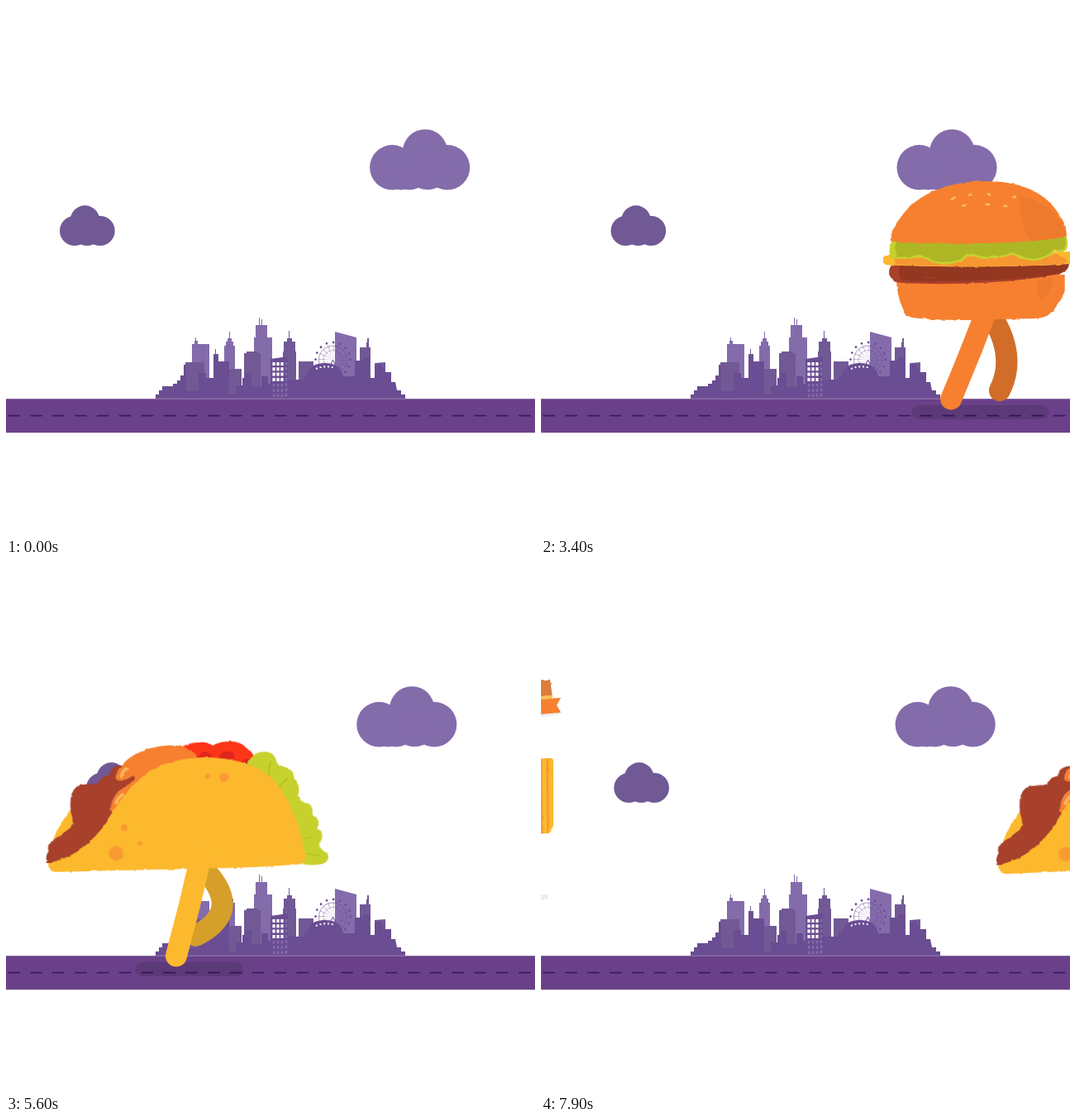
An HTML page without scripts that plays this animation: 640x640 px, repeating every 8 s.

```html
<!DOCTYPE html>
<html lang="en">
<head>
<meta charset="utf-8">
<title>Walking food</title>
<style>
html, body { margin: 0; width: 100%; height: 100%; overflow: hidden; background: #fff; }

/* One clock in seconds, ten ticks each, drives every formula below */
@property --t { syntax: "<number>"; inherits: true; initial-value: 0; }
@keyframes clock { from { --t: 0; } to { --t: 8; } }
svg { display: block; width: 100vw; height: 100vh; animation: clock 8s steps(80) -20ms infinite; }

.light { fill: #846cab; }
.mid { fill: #715995; }
.dark { fill: #6a4d92; }

/* Clouds drift, then turn back */
.cloud { transform: translateX(calc(min(var(--t), 11.96 - var(--t)) * var(--speed))); }
.big { --speed: -2.83px; }
.small { --speed: 5.73px; }

/* Walkers cross at constant speed; --at is when they stand as drawn, --mid when the far leg is upright */
.run { transform: translateX(calc((var(--t) - var(--at)) * 217.6px)); }
.burger { --at: 1.6; --mid: 1.39; }
.taco { --at: 6.3; --mid: 4.88; }
.cup { --at: 7.9; }
.burger, .taco {
  --p: calc((var(--t) - var(--mid)) * 300deg);
  --beat: cos(2 * var(--p));
}

/* Bobbing, twice per stride */
.sway {
  --sink: calc(.5 - .5 * cos((var(--t) - .4) * 600deg));
  transform: translateX(calc(var(--sink) * -6px));
}
.part { transform: translateY(calc(var(--sink) * var(--drop) * 1px)); }
.rock { transform-origin: 345px 255px; transform: rotate(calc(-.73deg - 1.47deg * var(--beat))); }
.shadow {
  transform: scaleX(calc(1.45 - .45 * var(--beat)));
  stroke: #000; stroke-opacity: .13; stroke-width: 17; stroke-linecap: round; vector-effect: non-scaling-stroke;
}

/* A leg is a unit curve: the first axis bends the knee, the second runs from hip to foot */
.leg {
  --q: calc(var(--p) + var(--turn, 0deg));
  --lift: pow(max(0, 0 - cos(var(--q))), 1.5);
  --lag: max(0, 0 - cos(var(--q) - 45deg));
  --knee: pow(max(0, 0 - cos(var(--q) - 15deg)), 2);
  transform: matrix(
    calc(1.5 + 78 * var(--knee)),
    calc(18 * var(--lift)),
    calc(2 + var(--lean, 0) - 55 * sin(var(--q)) + 8 * sin(2 * var(--q)) - 36 * var(--lag)),
    calc(119.5 - 34 * var(--lift)),
    0, 0);
  fill: none; stroke-width: 26; stroke-linecap: round; vector-effect: non-scaling-stroke;
}
.near { --turn: 180deg; --lean: -7; }
</style>
</head>
<body>
<svg viewBox="0 0 640 640" xmlns="http://www.w3.org/2000/svg">
  <defs>
    <filter id="rough" color-interpolation-filters="sRGB">
      <feTurbulence type="fractalNoise" baseFrequency=".13" numOctaves="2" seed="4"/>
      <feDisplacementMap in="SourceGraphic" scale="2.8" xChannelSelector="R" yChannelSelector="G"/>
    </filter>
  </defs>

  <g class="cloud big light">
    <circle cx="467.3" cy="195.3" r="27.2"/><circle cx="507" cy="176.5" r="27.2"/><circle cx="534" cy="195.3" r="27.2"/>
    <circle cx="478" cy="201" r="21.5"/><circle cx="488" cy="199" r="23.5"/><circle cx="510" cy="195.3" r="27"/>
  </g>
  <g class="cloud small mid">
    <circle cx="83" cy="272" r="18"/><circle cx="98" cy="272.4" r="17.6"/>
    <circle cx="95.5" cy="259" r="17.7"/><circle cx="113.7" cy="272" r="18"/>
  </g>

  <!-- City -->
  <g class="light">
    <path d="M225 475V409H228V405H229V401H230V405H232V409H246V475Z"/>
    <path d="M264 475V411H266V406H268V402H270V394H271V402H273V406H275V411H277V475Z"/>
    <path d="M300 475V401H302V386H306V377H307V386H309V379H310V386H316V401H322V475Z"/>
    <path d="M398 475V394L424 401V475Z"/>
  </g>
  <g class="mid">
    <path d="M217 475V431H240V475ZM251 475V421H253V415H254V421H257V475ZM270 475V439H285V475Z"/>
    <path d="M288 475V420H291V418H305V420H308V475ZM354 475V430H372V475Z"/>
    <path d="M335 475V418H336V406H340V402H342V393H343V402H346V406H350V418H351V475Z"/>
    <path d="M428 475V413H436V407H437V402H439V413H441V475ZM446 475V432L459 431V443H466V475Z"/>
  </g>
  <g fill="none" stroke="#6a4d92">
    <circle cx="395.5" cy="428" r="21" stroke-width="2.8" stroke-linecap="round" stroke-dasharray="0 8.247"/>
    <circle cx="395.5" cy="428" r="17" stroke-width=".6"/>
    <circle cx="395.5" cy="428" r="11.5" stroke-width=".4"/>
    <circle cx="395.5" cy="428" r="8.5" stroke-width="17" stroke-opacity=".6" stroke-dasharray=".4 2.938"/>
    <path d="M390 440L395.5 428L401 440"/>
  </g>
  <g class="dark">
    <path d="M181 475V470H185V465H189V460H202V457H207V453H211V447H215V434H218V466H233V444H242V450H251V423H256V430H270V470H278V459H286V450H290V444H297V461H309V448H317V457H320V427L341 424V452H360V475Z"/>
    <path d="M360 475V447H364Q367 432 386 432Q405 432 408 448H422V429H432V425H440V450H446V436L452 432L459 443H466V455H471L473 465H478V470H483V475Z"/>
  </g>
  <path d="M324 431V455M329 431V455M334 431V455" stroke="#fff" stroke-width="3.2" stroke-dasharray="4 2.3"/>
  <path d="M324 457V473M329 457V473M334 457V473M339 431V473" stroke="#846cab" stroke-width="2.5" stroke-dasharray="3.5 2.8"/>
  <path d="M375 439Q386 434 398 438" fill="none" stroke="#fff" stroke-width="2" stroke-dasharray="2 2.8"/>

  <!-- Road -->
  <path d="M0 475.3H640V516.3H0Z" fill="#6a4189"/>
  <path d="M182 475H483" stroke="#8a6fab" stroke-width=".8"/>
  <path d="M2.5 495.7H640" stroke="#3f1768" stroke-width="1.7" stroke-dasharray="14.5 12.35"/>

  <!-- Burger -->
  <g class="run burger"><g class="sway">
    <g transform="translate(140 491.5)"><path class="shadow" d="M-43.5 0H43.5"/></g>
    <g transform="translate(140 356)"><path class="leg" stroke="#d16d28" d="M0 0Q1 .5 0 1"/></g>
    <g filter="url(#rough)">
      <g class="part" style="--drop:3">
        <path fill="#f6802f" d="M38 325H242V345Q236 362 222 374Q215 378 205 378L130 380Q80 380 58 377Q50 376 47 368Q38 350 38 325Z"/>
        <path fill="#ee7a2d" d="M209 331L228 329Q224 350 213 357Q207 350 209 331Z"/>
      </g>
      <g class="part" style="--drop:5.5">
        <path fill="#a8402a" d="M33 313Q28 318 30 327Q33 334 45 335C100 338 180 335 225 326Q247 324 247 312C200 316 90 316 33 313Z"/>
        <path fill="#933721" d="M44 314Q38 323 45 332C100 335 180 332 225 325Q246 322 247 312C200 316 90 316 44 314Z"/>
        <path d="M72 328L86 330" stroke="#a8402a" stroke-width="1.5"/>
      </g>
      <g class="part" style="--drop:7">
        <path fill="#fcb92e" d="M28 301L250 297Q258 298 260 307Q258 312 248 312Q150 318 28 313.500Q22 313 22 307Q23 301 28 301Z"/>
        <path fill="#f79732" d="M36 304L232 300L246 308Q245 312 232 313Q130 317 36 313Z"/>
      </g>
      <g class="part" style="--drop:8.5">
        <path fill="#adb725" stroke="#c7d12e" stroke-width="2.5" d="M36 282Q28 296 33 304Q50 306 64 303Q76 304 84 310Q100 313 116 308Q124 300 130 301Q145 307 155 303Q170 304 179 299Q192 307 206 307Q224 304 229 295Q238 298 243 294Q246 287 242 277Z"/>
        <path d="M36 284Q30 296 37 304" fill="none" stroke="#c7d12e" stroke-width="6"/>
        <path d="M64 301L72 303" stroke="#c7d12e" stroke-width="1.8"/>
      </g>
      <g class="part" style="--drop:7">
        <path fill="#f6802f" d="M31 284Q32 269 44 255C62 229 98 212 145 212C200 212 226 232 241 262Q245 271 244 279C200 288 90 289 34 285Z"/>
        <path fill="#ee7a2d" d="M187 230C189 255 191 272 201 285L243 279C243 262 225 237 187 230Z"/>
        <path stroke="#fcb95a" stroke-width="3" stroke-linecap="round" d="M105.500 234L108.500 232M126 228H128.500M150 228H152M180 231H182M118.500 242L121.500 241M147 240H150M169 242H172"/>
      </g>
    </g>
    <g transform="translate(152 356)"><path class="leg near" stroke="#f6802f" d="M0 0Q1 .5 0 1"/></g>
  </g></g>

  <!-- Taco -->
  <g class="run taco">
    <g transform="translate(374 491.5)"><path class="shadow" d="M-43.5 0H43.5"/></g>
    <g transform="translate(376 356)"><path class="leg" stroke="#d59f2a" d="M0 0Q1 .5 0 1"/></g>
    <g class="rock"><g filter="url(#rough)">
      <path fill="#fcb92e" d="M206 335Q218 308 236 288L262 300L230 350Z"/>
      <path fill="#fd3519" d="M360 226Q374 217 387 218Q396 217 403 222Q412 217 425 217.500Q438 218 444 226Q452 232 452 240L446 262H370Z"/>
      <path fill="#e0251f" d="M385 240Q386 229 394 229Q402 231 404 240ZM410 237Q414 228 424 229Q431 233 428 241ZM436 246Q440 237 448 239L450 249Z"/>
      <path fill="#c7d12e" d="M443 250Q447 232 462 231Q474 229 479 239Q479 247 488 249Q500 252 501 264Q509 271 505 285Q507 292 517 295Q524 299 522 309Q531 313 529 321Q525 326 532 328Q536 336 529 344Q531 349 539 355Q543 364 533 368Q520 371 500 366Z"/>
      <path stroke="#aeb626" stroke-width="1.2" d="M470 261L472 243M483 273L493 263M511 337L522 335M512 355L529 358"/>
      <path fill="#f6802f" d="M284 264Q284 247 305 233Q330 219 358 221Q378 222 384 238L330 275Q300 290 278 302Q276 282 296 268Z"/>
      <path fill="none" stroke="#fbb55e" stroke-width="4" stroke-linecap="round" d="M292 257Q293 251 298 248M285 289Q287 283 293 279"/>
      <path fill="#a8412b" d="M199 360Q198 350 202 346Q199 336 210 331L229 318Q234 310 230 300Q227 276 238 268Q250 264 263 266Q267 256 277 255Q278 246 288 244Q296 243 291 247Q284 253 285 260Q290 266 305 257Q310 258 307 262L294 271Q279 278 278 298L285 305Q260 345 225 360Z"/>
      <path fill="#fcb92e" d="M201 360Q238 354 264 323C282 300 300 263 337 246Q362 236 392 236Q430 237 458 251C490 270 507 315 512 360Q513 367 503 368Q450 371 400 370.500L210 371Q201 371 201 360Z"/>
      <g fill="#f89b31">
        <circle cx="416" cy="261" r="6"/><circle cx="396" cy="259" r="3"/><circle cx="283.5" cy="350" r="9"/>
        <circle cx="294" cy="319" r="4"/><circle cx="313" cy="338" r="3"/>
      </g>
    </g></g>
    <g transform="translate(388 356)"><path class="leg near" stroke="#fcb92e" d="M0 0Q1 .5 0 1"/></g>
  </g>

  <!-- Next walker, only its leading edge gets in -->
  <g class="run cup"><g filter="url(#rough)">
    <path fill="#ececec" d="M-40 183L20 181V184L-40 188ZM-40 402L8 401V407L-40 409Z"/>
    <path fill="#de7c3b" d="M-40 143L11 141L14 163L-40 166Z"/>
    <path fill="#fdc05c" d="M-40 163L14 160V166L-40 170Z"/>
    <path fill="#f6802f" d="M-40 169L24 163L19 172L24 181L-40 186Z"/>
    <path fill="#fcb92e" d="M-40 238L13 236Q15 237 15 241V318L11 327L-40 329Z"/>
    <path d="M7.5 237L8.5 327M0 237L1 327" stroke="#f79732" stroke-width="2.5"/>
  </g></g>
</svg>
</body>
</html>
```
